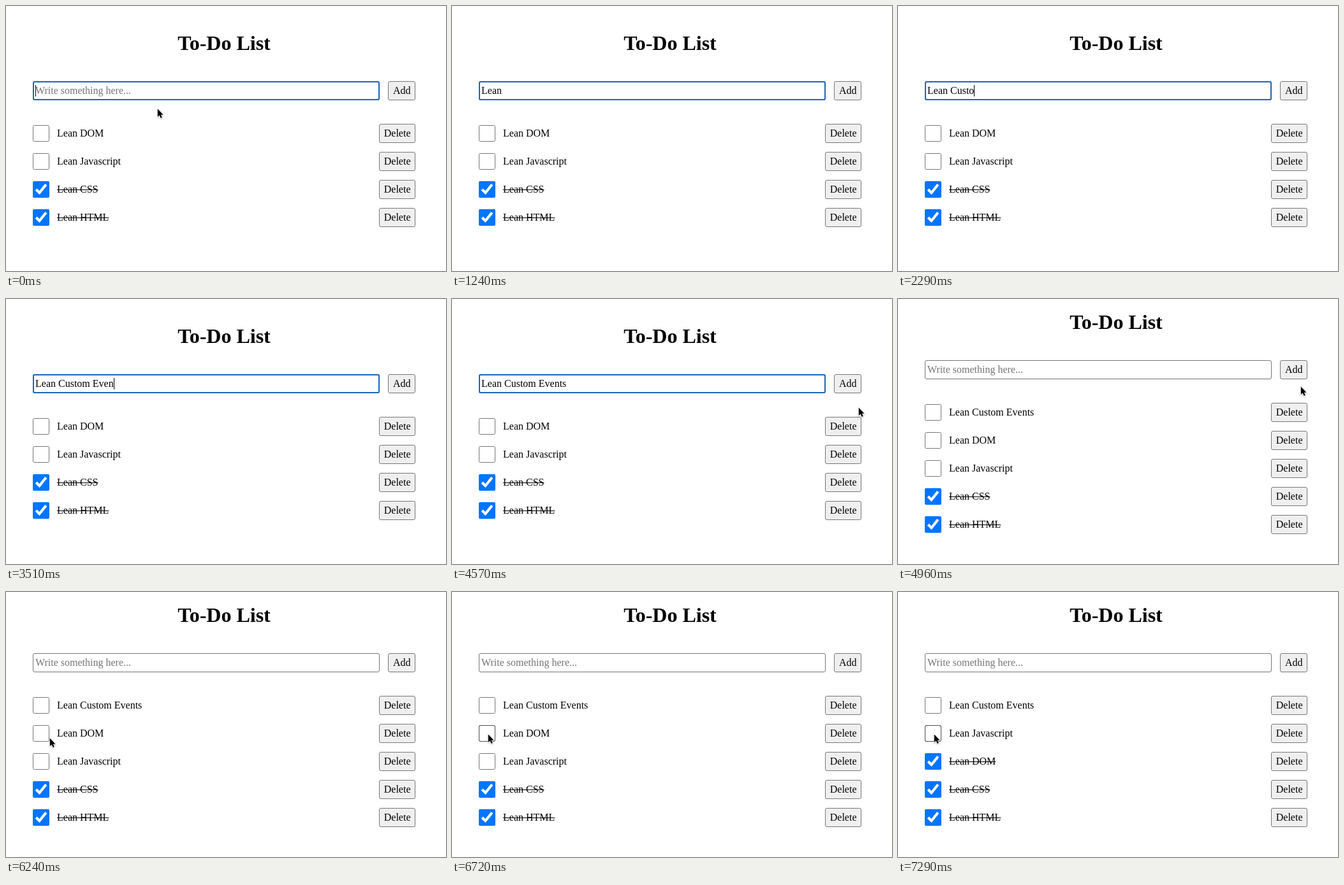
Recreate the animation shown at these times as an HTML page. Size 690x416 px, loop 8 s.

```html
<!DOCTYPE html>
<html lang="en">
<head>
<meta charset="utf-8">
<title>To-Do List</title>
<style>
  html, body { margin: 0; width: 100%; height: 100%; overflow: hidden; background: #fff; }
  body { position: relative; font: 16px/30px "Liberation Serif", Times, serif; color: #000; pointer-events: none; }
  #page, .row, .btn, .text, #field, #cursor, h1, .box, .ring { position: absolute; box-sizing: border-box; }
  #page { left: 42px; top: 0; width: 600px; }
  h1 { top: 40px; width: 100%; margin: 0; font-size: 32px; line-height: 37px; text-align: center; }
  #field { top: 118px; width: 544.4px; height: 30px; padding-left: 3px; line-height: 28px; white-space: pre;
    border: 1px solid #767676; border-radius: 3px; }
  #field.focus { outline: 2px solid #1a67b8; outline-offset: -2px; }
  #hint { color: #757575; }
  #caret { position: absolute; top: 5px; width: 1px; height: 18px; background: #000; }
  .btn { right: 0; height: 30px; padding: 0 6.5px; line-height: 28px; background: #efefef;
    border: 1px solid #767676; border-radius: 3px; }
  .hover { background: #e5e5e5; border-color: #4f4f4f; }
  .press { background: #f5f5f5; border-color: #8d8d8d; }
  #add { top: 118px; }
  .row { width: 100%; height: 30px; }
  .box, .ring { left: 0; top: 2px; width: 26px; height: 26px; margin: 0; }
  .ring { border: 1px solid #4f4f4f; border-radius: 3px; }
  .text { left: 38px; }
  .done .text { text-decoration: line-through; }
  #cursor { left: 0; top: 0; overflow: visible; filter: drop-shadow(0 1px 1px #0004); }
</style>
</head>
<body>
<div id="page">
  <h1>To-Do List</h1>
  <div id="field"><span id="typed"></span><span id="caret"></span><span id="hint">Write something here...</span></div>
  <div id="add" class="btn">Add</div>
</div>
<svg id="cursor" width="12" height="18">
  <path d="M.8 .4V13L3.7 10.5L5.7 15L7.8 14.1L5.9 9.7H9.6Z" stroke="#fff" stroke-width="1.4" paint-order="stroke"/>
</svg>
<script>
const LOOP = 8000, PRESS_ADD = 4802, ADDED = 4890, PRESS_BOX = 7130, CHECKED = 7290;
const TICK = 79; // the pointer is redrawn at this interval

// Bursts of typing, each at an even pace
const bursts = [
  { text: 'Lean', start: 260, pace: 150 },
  { text: ' ', start: 1320, pace: 0 },
  { text: 'Custom', start: 1720, pace: 142 },
  { text: ' Events', start: 2540, pace: 230 }
];
const TEXT = bursts.map(b => b.text).join('');
const keyTimes = bursts.flatMap(b => [...b.text].map((_, i) => b.start + i * b.pace));

const HOME = { x: 237, y: 161 };
const moves = [
  { start: 4170, ticks: 5, x: 637, y: 170 },
  { start: 4565, ticks: 3, x: 631, y: 137 },
  { start: 5608, ticks: 4, x: 243, y: 211 },
  { start: 6001, ticks: 3, x: 68, y: 229 },
  { start: 6238, ticks: 6, x: 56, y: 223 }
];
const ease = p => p * p * (3 - 2 * p);

function pointer(t) {
  return moves.reduce((from, to) => {
    const done = Math.floor((t - to.start) / TICK) / to.ticks;
    const p = ease(Math.min(1, Math.max(0, done)));
    return { x: from.x + (to.x - from.x) * p, y: from.y + (to.y - from.y) * p };
  }, HOME);
}

const $ = id => document.getElementById(id);
const page = $('page'), field = $('field'), typed = $('typed'), caret = $('caret');
const hint = $('hint'), add = $('add'), cursor = $('cursor');

const rows = [TEXT, 'Lean DOM', 'Lean Javascript', 'Lean CSS', 'Lean HTML'].map(label => {
  const row = document.createElement('div');
  row.innerHTML = `<input class="box" type="checkbox"><div class="ring"></div>
    <div class="text">${label}</div><div class="btn">Delete</div>`;
  page.append(row);
  return row;
});

function draw(t) {
  const added = t >= ADDED, checked = t >= CHECKED, focused = t < PRESS_ADD;
  const shift = added ? -22 : 0;
  const { x, y } = pointer(t);
  const inside = (left, top, w, h) => x >= left && x < left + w && y >= top && y < top + h;

  page.style.transform = `translateY(${shift}px)`;
  cursor.style.transform = `translate(${x}px, ${y}px)`;
  cursor.style.visibility = t >= keyTimes[0] && t < moves[0].start + TICK ? 'hidden' : 'visible';

  const count = keyTimes.filter(k => k <= t).length;
  typed.textContent = added ? '' : TEXT.slice(0, count);
  hint.hidden = !added && count > 0;
  field.className = focused ? 'focus' : '';
  const idle = t - (count ? keyTimes[count - 1] : 0);
  caret.hidden = !focused || idle % 1000 >= 500;
  const overAdd = inside(598, 118 + shift, 44, 30);
  add.className = 'btn' + (!overAdd ? '' : focused || added ? ' hover' : ' press');

  const order = checked ? [0, 2, 1, 3, 4] : added ? [0, 1, 2, 3, 4] : [1, 2, 3, 4];
  rows[0].hidden = !added;
  order.forEach((item, slot) => {
    const row = rows[item], top = 185 + 44 * slot;
    const done = item > 2 || (item === 1 && checked);
    const [box, ring] = row.children;
    row.className = done ? 'row done' : 'row';
    row.style.top = top + 'px';
    box.checked = done;
    ring.hidden = done || !inside(42, top + 2 + shift, 26, 26);
    ring.style.borderColor = t >= PRESS_BOX && !checked ? '#8d8d8d' : '#4f4f4f';
  });
}

(function tick() {
  draw(performance.now() % LOOP);
  requestAnimationFrame(tick);
})();
</script>
</body>
</html>
```
